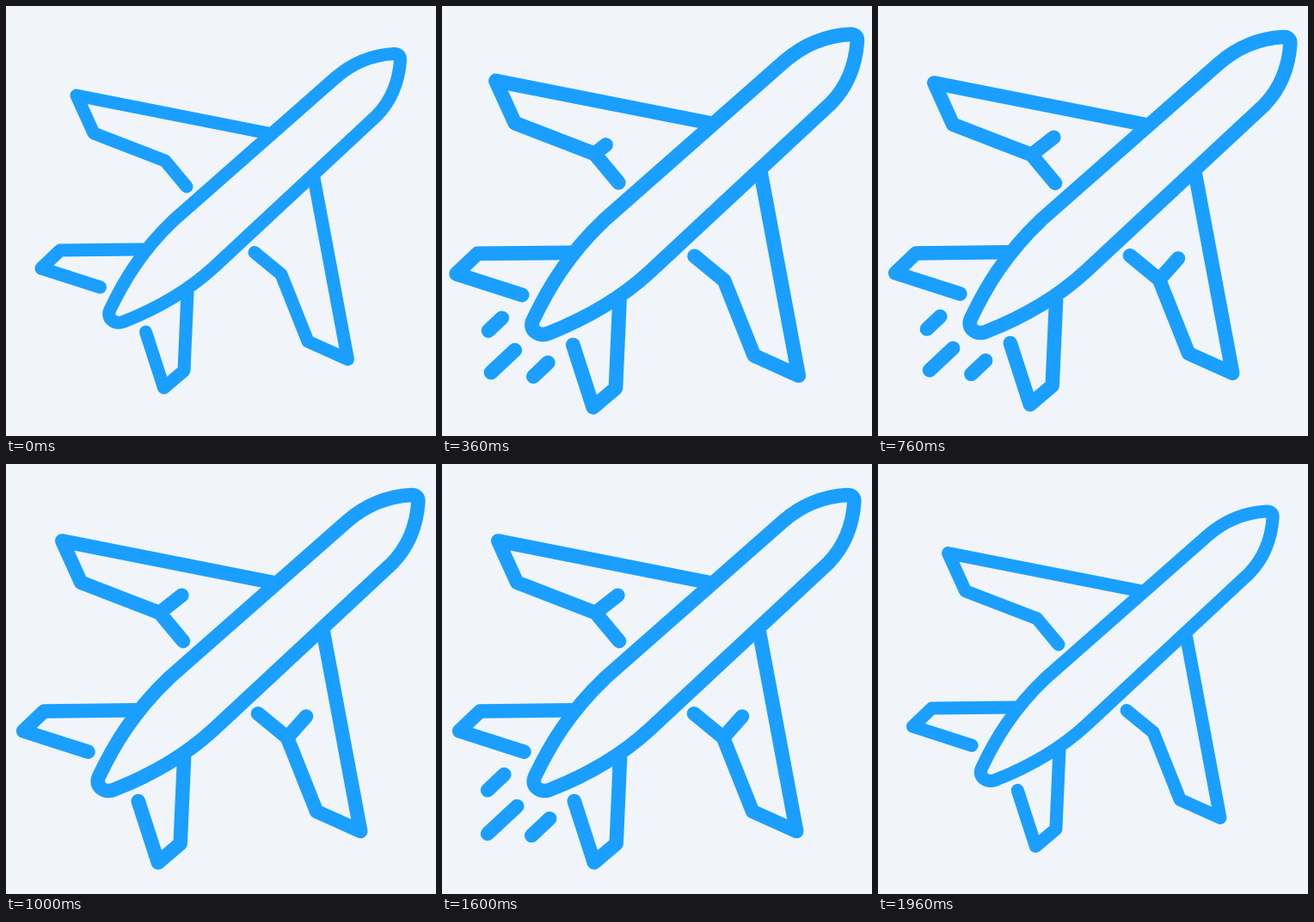
Recreate the animation shown at these times as an HTML page. Size 500 by 500 pixels, loop 2000 ms.

```html
<!DOCTYPE html>
<html lang="en">
<head>
<meta charset="utf-8">
<title>Airplane</title>
<style>
  html, body { margin: 0; width: 100%; height: 100%; overflow: hidden; background: #f1f5fa; }
  svg { display: block; width: 100%; height: 100%; }
  path { fill: none; stroke: #1a9fff; stroke-width: 15; stroke-linecap: round; stroke-linejoin: round; }
</style>
</head>
<body>
<svg viewBox="0 0 500 500">
  <g id="plane">
    <path d="M195 249L383 83.5C402 67 425 57 451 55.5Q459 55.5 458.5 63C457 84 450 108 431 127.5L242 303.5C212 331 175 352 137 367C126 371 116 363 121 353C136 321.5 157 285 195 249Z"/>
    <path d="M305 148L82 104L102 148L185 180L210 210"/>
    <path d="M357.5 197L397.5 411L351 390L320 312L289 286.5"/>
    <path d="M160 283L63 284L41 305L109.5 327"/>
    <path d="M211 333L207 424L183.5 444L162.5 379"/>
  </g>
</svg>
<script>
const LOOP = 2000, STEP = 40;
const plane = document.getElementById('plane');
const ramp = (t, a, b) => Math.min(1, Math.max(0, (t - a) / (b - a)));
const ease = (t, a, b) => { const p = ramp(t, a, b); return p * p * (3 - 2 * p); };

// A straight line of which only the part from one fraction to another shows.
function makeLine(x1, y1, x2, y2) {
  const path = document.createElementNS('http://www.w3.org/2000/svg', 'path');
  plane.append(path);
  const at = p => `${x1 + (x2 - x1) * p} ${y1 + (y2 - y1) * p}`;
  return (from, to) =>
    path.setAttribute('d', to - from > 0.001 ? `M${at(from)}L${at(to)}` : '');
}

const leftFlap = makeLine(185, 180, 208.5, 161.5);
const rightFlap = makeLine(320, 312, 340, 289.5);
const trails = [
  makeLine(88.5, 351, 71, 367.5),
  makeLine(102, 384.5, 71, 413.5),
  makeLine(136.5, 397.5, 117.5, 415.5)
];

function draw(t) {
  const scale = 1 + 0.12 * ease(t, 0, 400) - 0.02 * ease(t, 400, 520) - 0.1 * ease(t, 1600, 2000);
  plane.setAttribute('transform', `translate(250 250) scale(${scale}) translate(-250 -250)`);

  const retract = ramp(t, 1600, 1800);
  leftFlap(0, ramp(t, 280, 440) - retract);
  rightFlap(0, ramp(t, 360, 520) - retract);

  // Each exhaust puff grows for 200 ms, then its tail catches up.
  const flying = t >= 200 && t < 1800;
  const phase = flying ? (t - 200) % 400 : 0;
  for (const trail of trails) trail(ramp(phase, 200, 400), ramp(phase, 0, 200));
}

const start = performance.now();
function tick() {
  const t = (performance.now() - start) % LOOP;
  draw(Math.floor(t / STEP) * STEP);
  requestAnimationFrame(tick);
}
tick();
</script>
</body>
</html>
```
